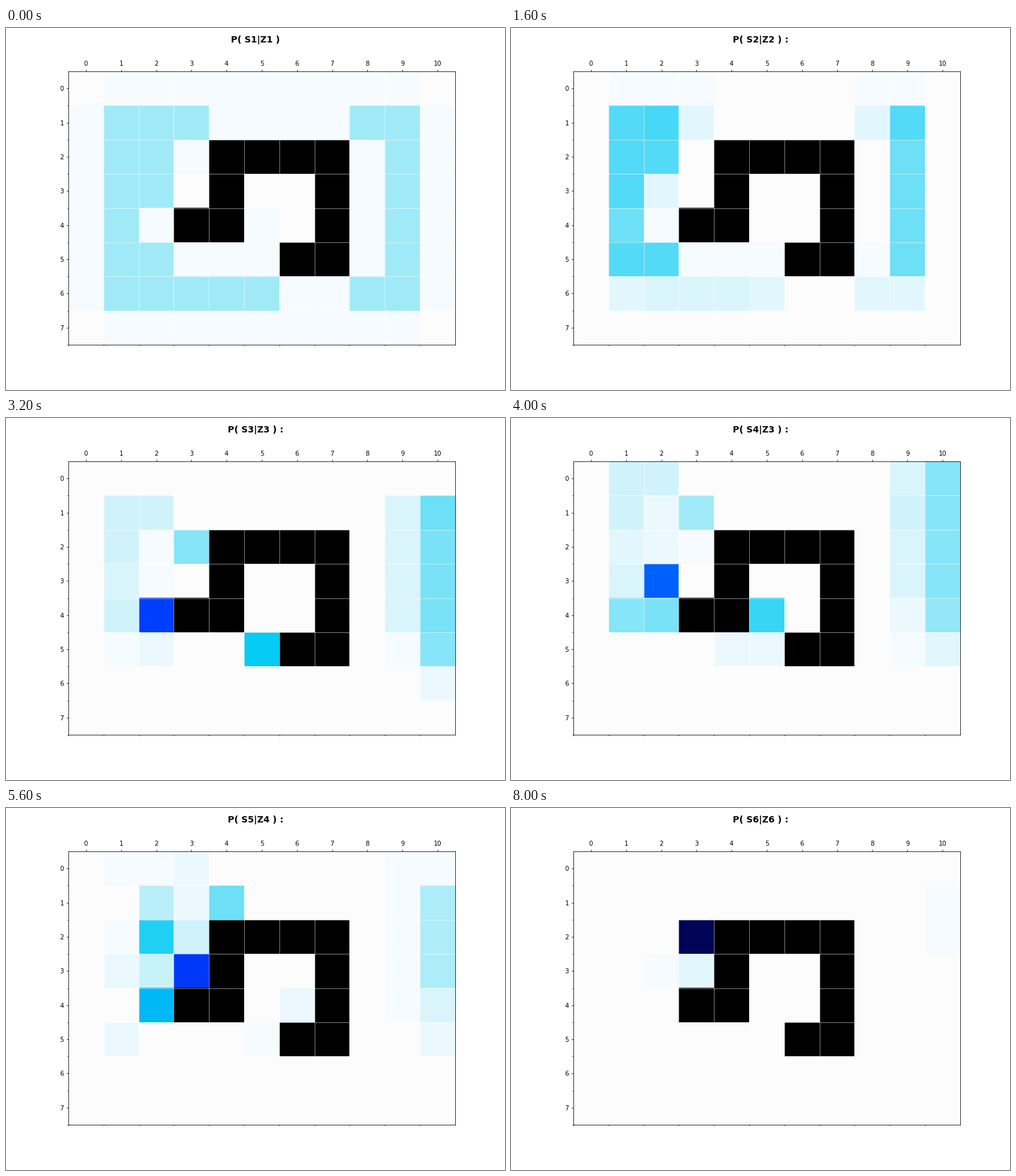
Recreate the animation shown at these times as a matplotlib script. Size 792x576 px, loop 8800 ms.

```python
import numpy as np
import matplotlib.pyplot as plt
from matplotlib.animation import FuncAnimation
from matplotlib.colors import LinearSegmentedColormap

# Robot localisation on a grid: alternate motion and sensor updates
ROWS, COLS = 8, 11
WALL = np.zeros((ROWS, COLS), dtype=bool)
WALL[2, 4:8] = True
WALL[2:6, 7] = True
WALL[2:5, 4] = True
WALL[4, 3] = WALL[5, 6] = True

COMPASS = "NESW"
STEP = dict(zip(COMPASS, [(-1, 0), (0, 1), (1, 0), (0, -1)]))
MOVES = "NNNEN"
SENSED = ["", "", "E", "", "ES", "E"]
HIT, FALSE_ALARM = 0.9, 0.05
STRAIGHT, DRIFT = 0.8, 0.1

CMAP = LinearSegmentedColormap.from_list("belief", [
    (0.0, "#fcfcfc"),
    (1 / 255, "#f5fbff"),
    (6 / 255, "#c7f2fa"),
    (21.5 / 255, "#00caf4"),
    (0.39, "#003eff"),
    (0.54, "#0028ee"),
    (1.0, "#000048"),
])
CMAP.set_bad("black")


def blocked(r, c):
    return not (0 <= r < ROWS and 0 <= c < COLS) or WALL[r, c]


def free_cells():
    return zip(*np.nonzero(~WALL))


def predict(belief, heading):
    i = COMPASS.index(heading)
    out = np.zeros_like(belief)
    for turn, p in ((0, STRAIGHT), (-1, DRIFT), (1, DRIFT)):
        dr, dc = STEP[COMPASS[(i + turn) % 4]]
        for r, c in free_cells():
            to = (r, c) if blocked(r + dr, c + dc) else (r + dr, c + dc)
            out[to] += p * belief[r, c]
    return out


def update(belief, sensed):
    out = belief.copy()
    for r, c in free_cells():
        for name, (dr, dc) in STEP.items():
            p = HIT if blocked(r + dr, c + dc) else FALSE_ALARM
            out[r, c] *= p if name in sensed else 1 - p
    return out / out.sum()


def run_filter():
    belief = update(~WALL / (~WALL).sum(), SENSED[0])
    steps = [("P( S1|Z1 )", belief)]
    for k, (move, sensed) in enumerate(zip(MOVES, SENSED[1:]), start=2):
        belief = predict(belief, move)
        steps.append((f"P( S{k}|Z{k - 1} ) :", belief))
        belief = update(belief, sensed)
        steps.append((f"P( S{k}|Z{k} ) :", belief))
    return [(text, np.ma.array(b, mask=WALL)) for text, b in steps]


steps = run_filter()

fig = plt.figure(figsize=(11, 8), dpi=72, facecolor="white")
ax = fig.add_axes([0.125, 0.125, 0.775, 0.755])
image = ax.imshow(steps[0][1], cmap=CMAP, vmin=-0.0003, vmax=1,
                  aspect="auto", interpolation="nearest")
title = fig.suptitle(steps[0][0], fontsize=14, fontweight="bold")

ax.set_xticks(range(COLS))
ax.set_yticks(range(ROWS))
ax.set_xticks(np.arange(-0.5, COLS - 1), minor=True)
ax.set_yticks(np.arange(0.5, ROWS), minor=True)
ax.tick_params(which="major", labelsize=10)
ax.tick_params(axis="x", which="major", top=True, labeltop=True,
               bottom=False, labelbottom=False)
ax.tick_params(axis="x", which="minor", top=False, bottom=True)
ax.grid(which="minor", color="white", linestyle="-", linewidth=0.5)


def draw(i):
    text, belief = steps[i]
    title.set_text(text)
    image.set_data(belief)
    return image, title


anim = FuncAnimation(fig, draw, frames=len(steps), interval=800,
                     repeat=True, repeat_delay=0, blit=False)
plt.show()
```
